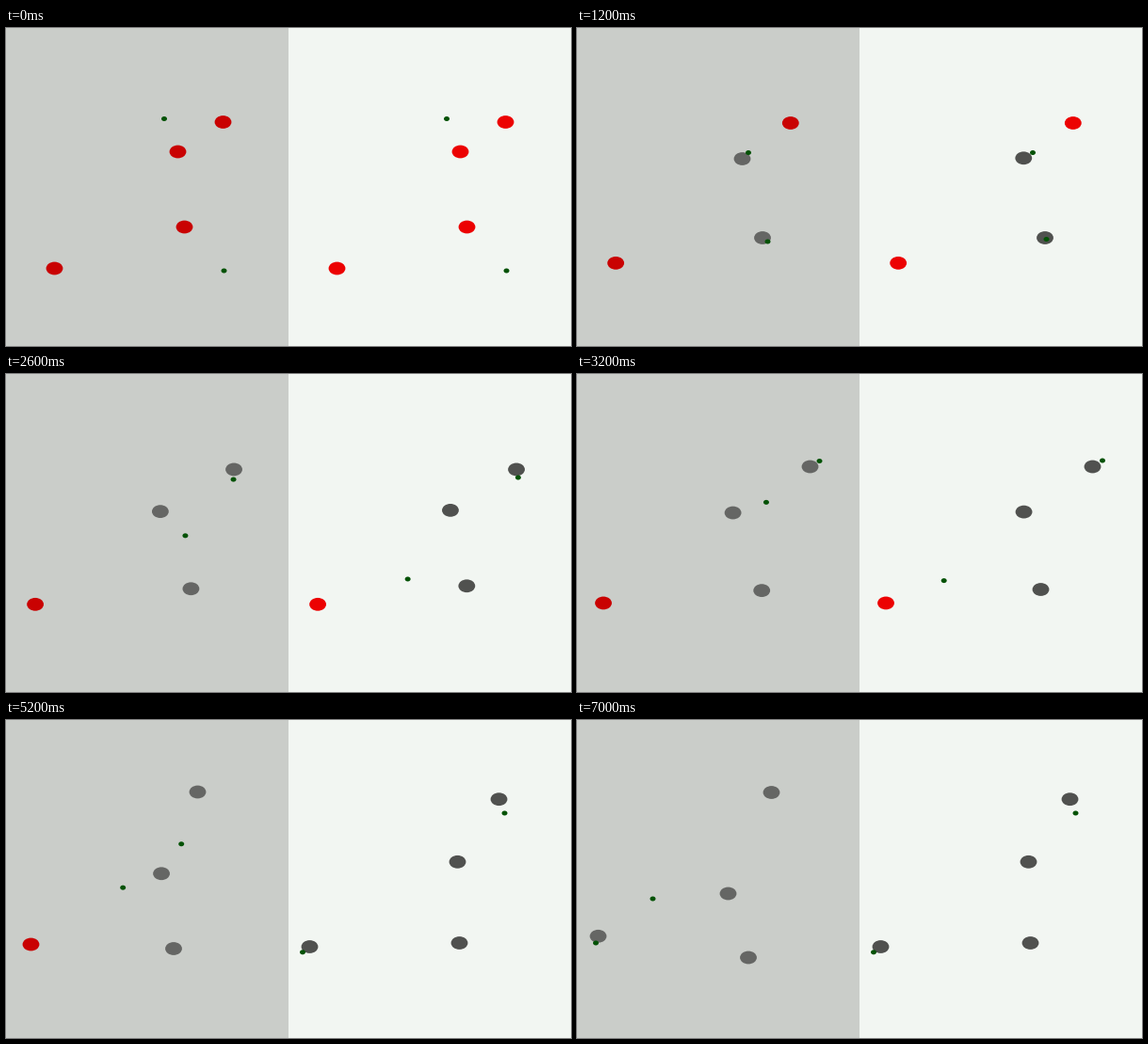
Recreate the animation shown at these times as a matplotlib script. Size 600 px wide and 338 px high, loop 7.2 s.

```python
import numpy as np
import matplotlib.pyplot as plt
from matplotlib.animation import FuncAnimation
from matplotlib.patches import Ellipse, Rectangle

W, H = 600, 338
FRAMES, INTERVAL = 72, 100
STEPS = 67
SPEED = 7.4   # distance an agent runs per step
REACH = 11.5  # a target counts as found within this distance

# Targets drift straight between a few turning points (step, x, y);
# the first stretch is common to both panels for two of them.
TOP = [(0, 230, 99.5), (12, 226.3, 100.5), (20, 235, 104.5), (31, 247, 98)]
CORNER = [(0, 51, 255), (18, 35.5, 246.5), (40, 22, 240.5)]
STARTS = [(167.5, 96), (231, 257.5)]


class Panel:
    """Agents run between stops (departure step, x, y) and wait at each."""

    def __init__(self, x0, bg, red, gray, drifts, routes):
        self.x0, self.red, self.gray = x0, red, gray
        ax.add_patch(Rectangle((x0, 0), W / 2, H, fc=bg, lw=0))
        self.targets = np.array([drift(points) for points in drifts])
        self.agents = np.array([run(p, r) for p, r in zip(STARTS, routes)])
        gaps = self.targets[:, None] - self.agents[None]
        near = np.hypot(gaps[..., 0], gaps[..., 1]).min(axis=1) < REACH
        self.found = np.logical_or.accumulate(near, axis=1)
        self.discs = [ellipse(17.8, 13.8, red, 2) for _ in drifts]
        self.dots = [ellipse(6, 5, "#045206", 3) for _ in routes]

    def show(self, step):
        shift = np.array([self.x0 + 0.5, 0.5])  # pixel centres
        for disc, path, found in zip(self.discs, self.targets, self.found):
            disc.center = path[step] + shift
            disc.set_facecolor(self.gray if found[step] else self.red)
        for dot, path in zip(self.dots, self.agents):
            dot.center = path[step] + shift


def ellipse(w, h, color, z):
    return ax.add_patch(Ellipse((0, 0), w, h, fc=color, lw=0, zorder=z))


def drift(points):
    s, x, y = np.array(points).T
    t = np.arange(STEPS)
    return np.column_stack([np.interp(t, s, x), np.interp(t, s, y)])


def run(start, route):
    pos = np.array(start, float)
    path = []
    for step in range(STEPS):
        path.append(pos)
        goal = [stop[1:] for stop in route if stop[0] <= step][-1]
        gap = np.array(goal) - pos
        pos = pos + gap * min(1, SPEED / max(np.hypot(*gap), 1e-9))
    return path


def update(frame):
    # after three seconds every tenth tick repeats the previous pose
    step = frame - max(0, (frame - 21) // 10)
    for panel in panels:
        panel.show(step)
    return []


fig = plt.figure(figsize=(W / 100, H / 100), dpi=100)
ax = fig.add_axes([0, 0, 1, 1])
ax.set(xlim=(0, W), ylim=(H, 0))
ax.axis("off")

panels = [
    Panel(
        0, "#cacdc9", "#c90202", "#656664",
        drifts=[
            TOP + [(49, 203, 76), (66, 206, 76.5)],
            [(0, 182, 131), (12, 175, 138.5), (22, 162, 144.5),
             (38, 167.5, 149), (66, 160, 184)],
            [(0, 189, 211), (12, 196.5, 222.5), (36, 195.5, 231.5),
             (49, 177.5, 242.5), (66, 181.5, 252)],
            CORNER + [(49, 26, 238), (66, 22, 229.3)],
        ],
        routes=[
            [(0, 181.5, 132), (15, 213, 146), (20, 257, 92), (38, 80, 189.5)],
            [(0, 202, 226.5), (16, 181.5, 199.7), (22, 201, 134),
             (37, 19.5, 236.5)],
        ],
    ),
    Panel(
        W / 2, "#f2f6f2", "#ec0202", "#50514f",
        drifts=[
            TOP + [(48, 223, 83.7)],
            [(0, 182, 131), (20, 168.3, 142.3), (38, 177.7, 148.5),
             (48, 179, 150.3)],
            [(0, 189, 211), (12, 196.5, 222.5), (20, 185, 220.3),
             (31, 192, 228.5), (48, 181, 236.5)],
            CORNER,
        ],
        routes=[
            [(0, 183.5, 132), (15, 216, 144.5), (20, 257.5, 91.5),
             (37, 229, 98.5)],
            [(0, 198, 224), (15, 170.5, 215.5), (20, 80.5, 219.5),
             (32, 14.5, 246.3)],
        ],
    ),
]

anim = FuncAnimation(fig, update, frames=FRAMES, interval=INTERVAL,
                     repeat=True, repeat_delay=0)
plt.show()
```
